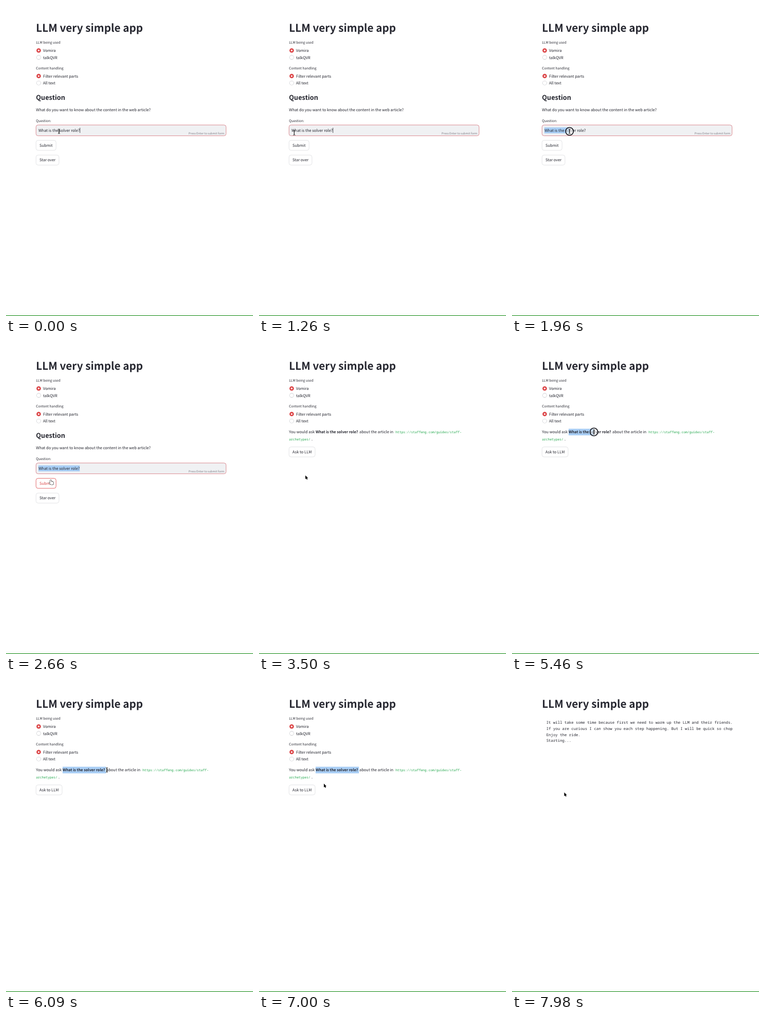
These frames come from a looping animation (480x601 px, 8000 ms). An HTML page with a canvas:

```html
<!DOCTYPE html>
<html lang="en">
<head>
<meta charset="utf-8">
<title>LLM very simple app</title>
<style>
  html, body { margin: 0; width: 100%; height: 100%; overflow: hidden; background: #fff; }
  canvas { display: block; width: 480px; height: 601px; }
</style>
</head>
<body>
<canvas id="stage"></canvas>
<script>
const W = 480, H = 601, LOOP = 8000, STEP = 70;
const INK = '#262730', RED = '#dc4648', GREEN = '#1fa64a', SELECT = '#a9cef5';
const SANS = '"Noto Sans CJK JP", "Noto Sans CJK SC", "Noto Sans", sans-serif';
const MONO = '"Noto Sans Mono", "DejaVu Sans Mono", monospace';

// Type sizes follow one rem
const REM = 7.53, SMALL = REM * 0.875, TINY = REM * 0.75, TITLE = REM * 2.75;
const STRONG = REM * 0.967, HEADING = STRONG * 1.75;
const CODE = 7.36, INLINE = CODE * 6 / 7;
const LEFT = 58.3;

// Key moments in ms
const BLUR = 2800, ANSWER = 3430, RUN = 7630;
const DRAG_FIELD = [1610, 2380], DRAG_ANSWER = [5110, 5880];
const PRESSES = [DRAG_FIELD, DRAG_ANSWER, [BLUR, 2940], [7350, 7490]];

const canvas = document.getElementById('stage');
const ctx = canvas.getContext('2d');
const dpr = window.devicePixelRatio || 1;
canvas.width = W * dpr;
canvas.height = H * dpr;
ctx.scale(dpr, dpr);
ctx.textRendering = 'geometricPrecision';

function setFont(size, weight = 400, family = SANS) {
  ctx.font = `${weight} ${size}px ${family}`;
}

function text(str, x, y, size = REM, weight = 400, color = INK) {
  setFont(size, weight);
  ctx.fillStyle = color;
  ctx.fillText(str, x, y);
}

function code(str, x, y, size, color) {
  setFont(size, 400, MONO);
  ctx.fillStyle = color;
  ctx.fillText(str, x, y);
}

function makeButton(label, y) {
  setFont(REM);
  return { label, x: LEFT, y, w: ctx.measureText(label).width + 13.4, h: 19.4 };
}

const SUBMIT = makeButton('Submit', 260.4);
const RESTART = makeButton('Star over', 289);
const ASK = makeButton('Ask to LLM', 199.5);
const FIELD = { x: LEFT, y: 230.7, w: 369.4, h: 20.9 };

const inside = (p, b) => p.x >= b.x && p.x <= b.x + b.w && p.y >= b.y && p.y <= b.y + b.h;
const within = (t, [from, to]) => t >= from && t < to;
const easeOut = u => 1 - (1 - u) ** 1.4;

// The pointer glides from stop to stop and rests in between
const STOPS = [
  { span: [0, 560], x: 86, y: 266 },
  { span: [770, 1400], x: 66, y: 243 },
  { span: DRAG_FIELD, x: 146, y: 243 },
  { span: [2380, 2660], x: 87, y: 264 },
  { span: [ANSWER, 4410], x: 119, y: 170.5 },
  { span: [4480, 5040], x: 110, y: 170.5 },
  { span: DRAG_ANSWER, x: 196, y: 170.5 },
  { span: [6580, 7000], x: 126, y: 197 },
  { span: [7000, 7280], x: 101.5, y: 214 }
];

function pointerAt(t) {
  return STOPS.reduce((p, { span: [from, to], x, y }) => {
    const k = easeOut(Math.min(1, Math.max(0, (t - from) / (to - from))));
    return { x: p.x + (x - p.x) * k, y: p.y + (y - p.y) * k };
  }, { x: 103, y: 243 });
}

function box({ x, y, w, h }, fill, stroke) {
  ctx.beginPath();
  ctx.roundRect(x, y, w, h, 4);
  ctx.fillStyle = fill;
  ctx.fill();
  ctx.strokeStyle = stroke;
  ctx.lineWidth = 0.8;
  ctx.stroke();
}

function disc(x, y, r, fill) {
  ctx.beginPath();
  ctx.arc(x, y, r, 0, 2 * Math.PI);
  ctx.fillStyle = fill;
  ctx.fill();
}

function button(b, p, down) {
  const hot = inside(p, b), active = hot && down;
  box(b, active ? RED : '#fff', hot ? RED : '#dcdde0');
  text(b.label, b.x + 6.7, b.y + 12.4, REM, 400, active ? '#fff' : hot ? RED : INK);
}

// First option is the chosen one
function radioGroup(title, options, y) {
  text(title, LEFT, y, SMALL);
  options.forEach((label, i) => {
    const cy = y + 12.8 + i * 13.4;
    disc(63.5, cy, 4.3, i ? '#c3c4c9' : RED);
    disc(63.5, cy, i ? 3.7 : 1.6, '#fff');
    text(label, 72, cy + 2.9);
  });
}

// Marks whole characters up to the pointer
function highlight(str, x, y, h, reach) {
  let w = 0;
  for (let n = 1; n <= str.length; n++) {
    const next = ctx.measureText(str.slice(0, n)).width;
    if (x + next > reach + 1) break;
    w = next;
  }
  ctx.fillStyle = SELECT;
  ctx.fillRect(x, y, w, h);
}

function form(t, p, down) {
  const focus = t < BLUR, query = 'What is the solver role?';
  text('Question', LEFT, 181.9, HEADING, 700);
  text('What do you want to know about the content in the web article?', LEFT, 203.7);
  text('Question:', LEFT, 224.6, SMALL);
  box(FIELD, '#f0f1f3', focus ? '#d4727a' : '#f0f1f3');
  setFont(REM);
  if (focus && t >= DRAG_FIELD[0]) {
    highlight(query, 63, 235.3, 11.6, t < DRAG_FIELD[1] ? p.x : W);
  } else if (focus && t % 1000 < 500) {
    ctx.fillStyle = INK;
    ctx.fillRect(143.4, 236, 0.8, 10);
  }
  text(query, 63, 243.7);
  if (focus) {
    ctx.textAlign = 'right';
    text('Press Enter to submit form', 424.3, 249.2, TINY, 400, '#7d7e86');
    ctx.textAlign = 'left';
  }
  button(SUBMIT, p, down);
  button(RESTART, p, down);
}

function answer(t, p, down) {
  const query = 'What is the solver role? ';
  text('You would ask', LEFT, 173.4);
  setFont(STRONG, 700);
  if (t >= DRAG_ANSWER[0]) {
    highlight(query, 110, 164.3, 12.8, t < DRAG_ANSWER[1] ? p.x : W);
  }
  text(query, 110, 173.4, STRONG, 700);
  text('about the article in', 194.9, 173.4);
  code('https://staffeng.com/guides/staff-', 265.2, 173.2, INLINE, GREEN);
  code('archetypes/', LEFT, 186.7, INLINE, GREEN);
  text('.', 102, 186.9);
  button(ASK, p, down);
}

function log() {
  [
    'It will take some time because first we need to warm up the LLM and their friends.',
    'If you are curious I can show you each step happening. But I will be quick so chop',
    'Enjoy the ride.',
    'Starting...'
  ].forEach((line, i) => code(line, 66.7, 81 + i * 11.77, CODE, INK));
}

function arrow() {
  ctx.beginPath();
  ctx.moveTo(0, 0);
  ctx.lineTo(0, 7);
  ctx.lineTo(4.9, 5);
  ctx.closePath();
  ctx.fillStyle = ctx.strokeStyle = '#000';
  ctx.fill();
  ctx.beginPath();
  ctx.moveTo(1.8, 4);
  ctx.lineTo(3.5, 8);
  ctx.lineWidth = 1.4;
  ctx.stroke();
}

function beam() {
  ctx.beginPath();
  for (const end of [-4.5, 4.5]) {
    for (const side of [-2, 2]) {
      ctx.moveTo(0, 0);
      ctx.lineTo(0, end * 0.7);
      ctx.quadraticCurveTo(0, end, side, end);
    }
  }
  ctx.lineWidth = 0.9;
  ctx.strokeStyle = '#111';
  ctx.stroke();
}

function hand() {
  ctx.beginPath();
  ctx.roundRect(-1, -0.5, 2, 7, 1);
  ctx.roundRect(-1, 2.7, 6, 6, 2);
  ctx.roundRect(-3, 4.4, 4, 2.4, 1.2);
  ctx.lineWidth = 1.2;
  ctx.strokeStyle = '#222';
  ctx.stroke();
  ctx.fillStyle = '#fff';
  ctx.fill();
}

function pointer(t, p, down) {
  if (down) {
    disc(p.x, p.y, 7.5, 'rgba(255,255,255,.5)');
    ctx.lineWidth = 1.7;
    ctx.strokeStyle = '#15151c';
    ctx.stroke();
  }
  const asking = t < ANSWER, done = t >= RUN;
  const buttons = done ? [] : asking ? [SUBMIT, RESTART] : [ASK];
  const overText = asking ? inside(p, FIELD) : !done && p.y > 163 && p.y < 190;
  ctx.save();
  ctx.translate(p.x, p.y);
  if (buttons.some(b => inside(p, b))) hand();
  else if (overText) beam();
  else arrow();
  ctx.restore();
}

function draw(t) {
  const p = pointerAt(t), down = PRESSES.some(span => within(t, span));
  ctx.fillStyle = '#fff';
  ctx.fillRect(0, 0, W, H);
  text('LLM very simple app', LEFT, 50.1, TITLE, 700);
  if (t < RUN) {
    radioGroup('LLM being used', ['Vomira', 'talkQVR'], 73.4);
    radioGroup('Content handling', ['Filter relevant parts', 'All text'], 123);
  }
  if (t < ANSWER) form(t, p, down);
  else if (t < RUN) answer(t, p, down);
  else log();
  ctx.fillStyle = '#008000';
  ctx.fillRect(0, 600, W, 1);
  pointer(t, p, down);
}

const start = performance.now();
function tick() {
  const t = (performance.now() - start) % LOOP;
  draw(Math.floor(t / STEP) * STEP);
  requestAnimationFrame(tick);
}
tick();
</script>
</body>
</html>
```
